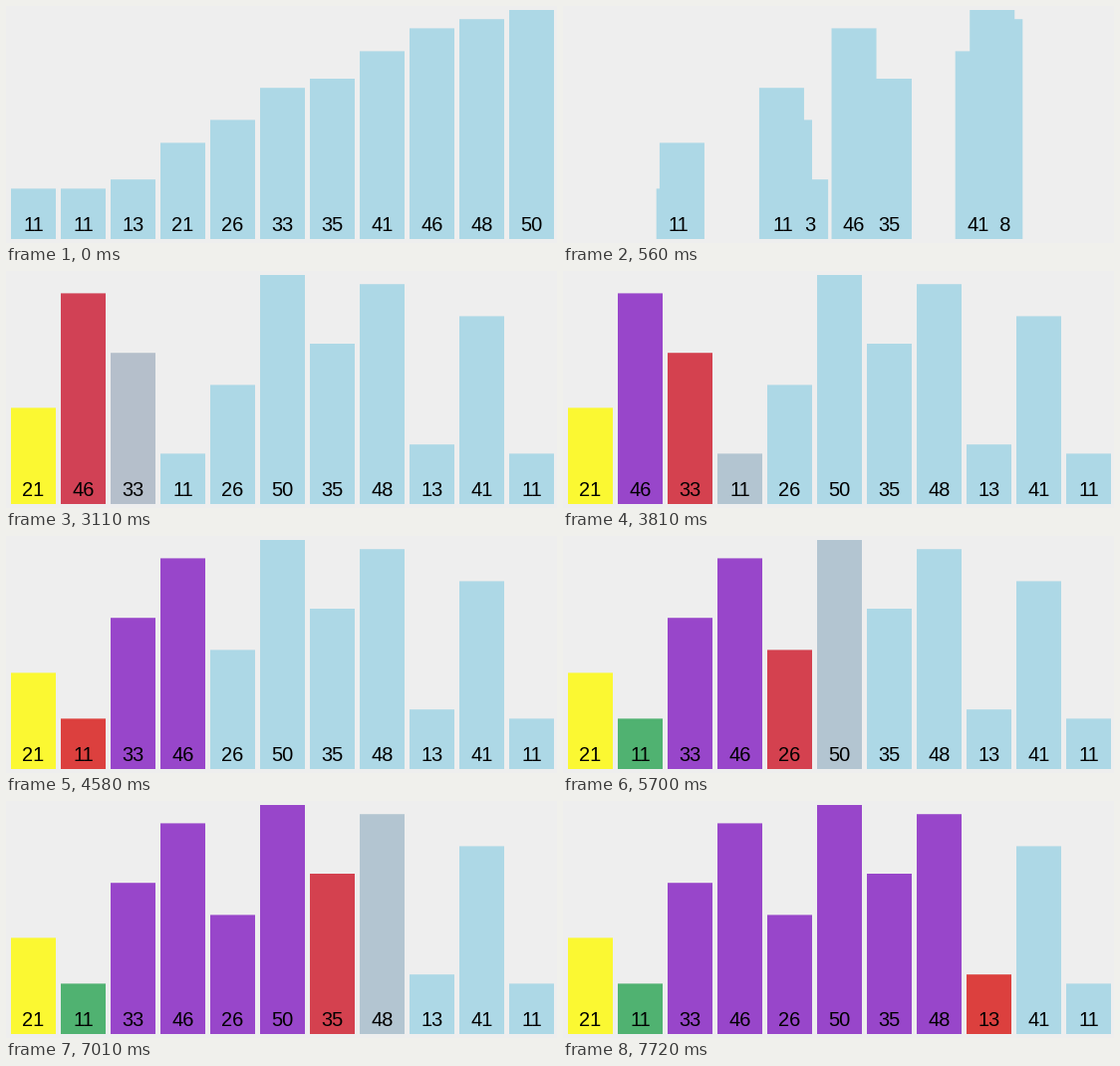
Recreate the animation shown at these times as a matplotlib script. Size 553 by 238 pixels, loop 8000 ms.

```python
import matplotlib.pyplot as plt
from matplotlib.animation import FuncAnimation
from matplotlib.colors import to_rgb
from matplotlib.patches import Rectangle
import numpy as np

W, H, DPI = 553, 238, 64
LOOP, TICK = 8000, 20
BASE, UNIT, PITCH, BAR_W, LEFT = 234, 4.6, 50, 45, 5
HOLD = 60           # the picture refreshes every 60 ms while something changes
MOVE, FADE = 220, 175

VALUES = [21, 46, 33, 11, 26, 50, 35, 48, 13, 41, 11]
SORTED_SLOTS = [3, 8, 5, 1, 4, 10, 6, 9, 2, 7, 0]
SHUFFLED = list(range(len(VALUES)))
SWAPPED = [0, 3, 2, 1] + SHUFFLED[4:]

BLUE, YELLOW, RED, PURPLE, GREEN = (
    np.array(to_rgb(c))
    for c in ("lightblue", "#fbf832", "#dc403e", "#9846ca", "#50b271"))

# (first visible change, time already elapsed in the easing, slots)
MOVES = [(500, 41, SHUFFLED), (4340, 25, SWAPPED)]

# (first visible change, time already elapsed, {bar: new colour})
FADES = [
    (1810, 55, {0: YELLOW}),
    (2460, 55, {1: RED}),
    (3110, 60, {1: PURPLE, 2: RED}),
    (3760, 55, {2: PURPLE, 3: RED}),
    (5050, 55, {3: GREEN, 4: RED}),
    (5700, 55, {4: PURPLE, 5: RED}),
    (6300, 53, {5: PURPLE, 6: RED}),
    (6960, 55, {6: PURPLE, 7: RED}),
    (7600, 55, {7: PURPLE, 8: RED}),
]


def ease(u):
    u = min(max(u, 0), 1)
    return 4 * u**3 if u < 0.5 else 1 - 4 * (1 - u)**3


def progress(t, first, lead, duration):
    """Eased progress, held between refreshes."""
    first -= first % TICK
    if t < first:
        return 0
    return ease((lead + (t - first) // HOLD * HOLD) / duration)


def state(t):
    slots = np.array(SORTED_SLOTS, float)
    for first, lead, goal in MOVES:
        slots += (np.array(goal) - slots) * progress(t, first, lead, MOVE)
    colors = [BLUE] * len(VALUES)
    for first, lead, changes in FADES:
        p = progress(t, first, lead, FADE)
        for i, color in changes.items():
            colors[i] = colors[i] + (color - colors[i]) * p
    return LEFT + PITCH * slots, colors


fig = plt.figure(figsize=(W / DPI, H / DPI), dpi=DPI, facecolor="#eeeeee")
ax = fig.add_axes([0, 0, 1, 1])
ax.set(xlim=(0, W), ylim=(H, 0))
ax.axis("off")

bars, labels = [], []
for z, value in enumerate(VALUES):
    height = value * UNIT
    bars.append(ax.add_patch(Rectangle(
        (0, BASE - height), BAR_W, height, lw=0, snap=False, zorder=2 * z + 1)))
    labels.append(ax.text(
        0, 226, str(value), family="Liberation Sans", size=20 * 72 / DPI,
        ha="center", va="baseline", color="black", zorder=2 * z + 2))


def draw(frame):
    xs, colors = state(frame * TICK)
    for bar, label, x, color in zip(bars, labels, xs, colors):
        bar.set_x(x)
        bar.set_facecolor(color)
        label.set_x(x + BAR_W / 2)
    return bars + labels


anim = FuncAnimation(fig, draw, frames=LOOP // TICK, interval=TICK,
                     repeat=True, repeat_delay=0, blit=False)
plt.show()
```
